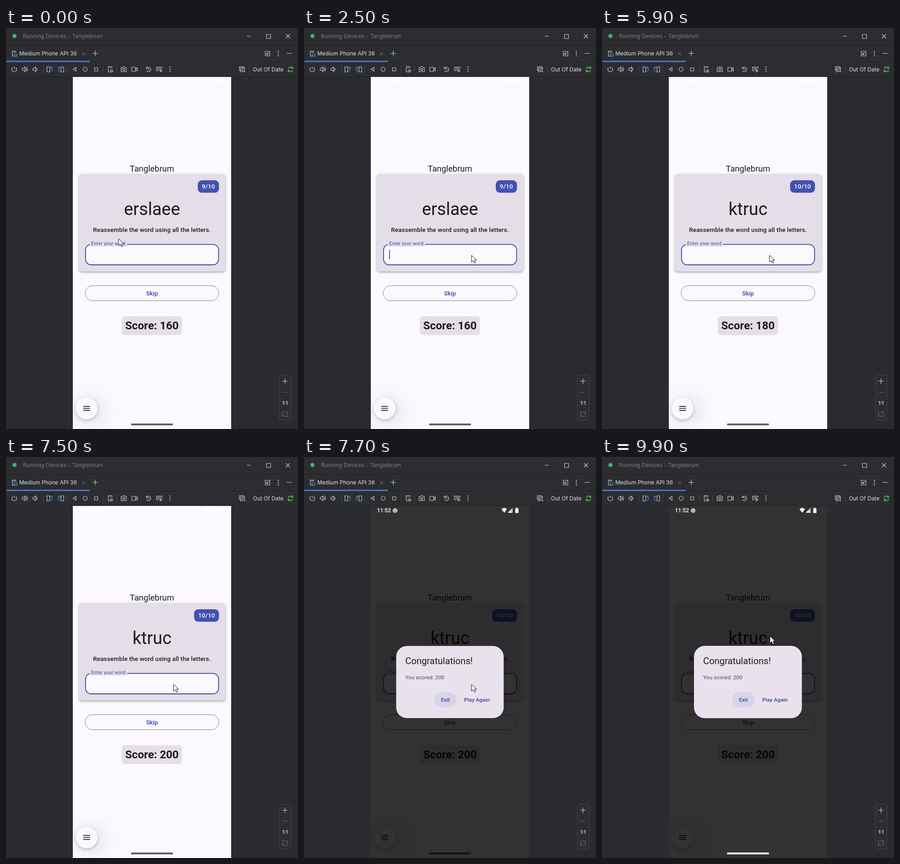
An HTML page for the animation above (10 s loop, 638 by 877 pixels).

```html
<!DOCTYPE html>
<html lang="en">
<head>
<meta charset="utf-8">
<title>Word game</title>
<style>
html, body { margin: 0; width: 100%; height: 100%; overflow: hidden; background: #2b2d30; }
svg { display: block; width: 638px; height: 877px; }
text { white-space: pre; }
.ui { font: 12px Inter, sans-serif; fill: #dfe1e5; }
.app { font-family: Roboto, sans-serif; fill: #1b1b1f; }
.mid { text-anchor: middle; }
.title { font-size: 13.47px; font-weight: 500; letter-spacing: .13px; }
.button { font-weight: 500; fill: #3a46a6; text-anchor: middle; }
.line { fill: none; stroke: #ced0d6; stroke-width: 1.15; }
.dim { stroke: #64676d; }
.blue { stroke: #548af7; }
.green { stroke: #57b65f; }
.dots { fill: #ced0d6; }
.card { filter: drop-shadow(0 2px 2px #0005); }
.fab { filter: drop-shadow(0 3px 4px #0003) drop-shadow(9px 5px 20px #0002); }
</style>
</head>
<body>
<svg viewBox="0 0 638 877">
  <defs>
    <clipPath id="screen"><path d="M146 107H492V877H146Z"/></clipPath>
    <g id="more"><circle cy="-4.8" r="1.2"/><circle r="1.2"/><circle cy="4.8" r="1.2"/></g>
    <g id="gear"><circle r="3.6"/><circle r="1.3"/><circle r="4.6" stroke-dasharray="1.8 1.8"/></g>
  </defs>

  <!-- Window, tab and tool bars -->
  <path d="M0 0H638V877H0Z" fill="#2b2d30"/>
  <path d="M0 107H638V877H0Z" fill="#2a2b2f"/>
  <path d="M0 37.5H638M0 74.5H638M0 106.5H638" stroke="#1e1f22"/>
  <path d="M1 71.5H183V74.5H1Z" fill="#4a7bd0"/>
  <circle cx="18.5" cy="17.5" r="4.5" fill="#3fb56b"/>
  <text class="ui" x="37" y="22" style="fill:#7a7d84">Running Devices - Tanglebrum</text>
  <text class="ui" x="29" y="60">Medium Phone API 36</text>
  <text class="ui" x="539.5" y="94.5">Out Of Date</text>
  <path d="M81.5 82V99M132.5 82V99M212.5 82V99M241.5 82V99M296.5 82V99M531.5 82V99" stroke="#43454a"/>

  <g class="line">
    <path d="M526 18H535M569 14H578V23H569ZM611.5 13.5L620.5 22.5M620.5 13.5L611.5 22.5"/>
    <path d="M19 61.5H14V50.5H21V54M16 52.5H19"/>
    <path class="green" d="M23 61.5H24.5"/>
    <path class="blue" d="M18 56H24V60.5H18ZM19.5 62.5H23"/>
    <path class="dim" d="M166.5 53.5L172.5 59.5M172.5 53.5L166.5 59.5"/>
    <path d="M189 55.5H201M195 49.5V61.5M613 55.5H624"/>
    <path d="M566.5 51H576.5V61H566.5ZM574 53.5L569.5 58M569.5 54.5V58H573"/>

    <path d="M18 84.5V90M14.5 86.5A5.3 5.3 0 1 0 21.5 86.5"/>
    <path d="M35.5 88H38L41.5 85V95.5L38 92.5H35.5ZM43.5 87.5Q45.5 90 43.5 92.8M45 85Q49 90 45 95.2"/>
    <path d="M59 88H61.5L65 85V95.5L61.5 92.5H59ZM67 87.5Q69 90 67 92.8"/>
    <path d="M89.5 85H95.5V96H89.5ZM126 85H120V96H126Z"/>
    <path class="blue" d="M97.5 95.5Q103.5 93 101 87.5L97.5 86M98.5 89V85.5H102M118 95.5Q112 93 114.5 87.5L118 86M117 89V85.5H113.5"/>
    <path d="M153 86V94.5L146.5 90.2ZM193.5 87H200.5V94H193.5Z"/>
    <circle cx="173" cy="90.2" r="4.4"/>
    <path d="M227 96H223.5V84.5H231.5V88M226 86.5H229"/>
    <use href="#gear" transform="translate(230.5 94) scale(.72)"/>
    <path d="M251.5 86.5H254L255.5 84.5H259L260.5 86.5H263V95.5H251.5Z"/>
    <circle cx="257.2" cy="90.7" r="2.3"/>
    <path d="M275 86H283V95H275ZM283 89.5L287 87V94L283 91.5"/>
    <path d="M306.5 85V88.5H310M307 88A5 5 0 1 1 307 93M311 88V91H313.5"/>
    <path d="M334 93.5H329V85.5H341V89M331 88H339M331 90.5H335M336.5 90L341 94L338.5 94.5L337 96.5Z"/>
    <path d="M513 93H510V84.5H519.5V87M516 96H512.5V87H521.5V89.5"/>
    <circle cx="518" cy="92" r="2.8"/><path d="M520 94L522.5 96.5"/>
    <path class="green" stroke-width="1.6" d="M616.5 89A5.2 5.2 0 0 1 626 88M626.5 84.5V88.5H622.5M626.5 92A5.2 5.2 0 0 1 617 93M616.5 96.5V92.5H620.5"/>
  </g>
  <g class="dots">
    <use href="#more" x="595" y="56"/><use href="#more" x="358.2" y="90.3"/>
  </g>

  <!-- Zoom controls -->
  <rect x="597.5" y="759.5" width="25" height="98" rx="4" fill="#2b2d30" stroke="#43454a"/>
  <path class="line" d="M603.5 772.5H615.5M609.5 766.5V778.5"/>
  <path class="line dim" d="M603.5 796.5H615.5M603.5 839H615.5V849.5H603.5ZM606 844V847H609M610 841.5H613V844.5"/>
  <text class="ui mid" x="609.7" y="824" style="font-size:10px;font-weight:600">1:1</text>

  <!-- Phone screen -->
  <g clip-path="url(#screen)">
    <path d="M146 107H492V877H146Z" fill="#fcf9fe"/>
    <text class="app mid" x="319" y="313.5" font-size="18.3">Tanglebrum</text>
    <rect class="card" x="159" y="319" width="320.5" height="213.5" rx="7" fill="#e4dee8"/>
    <rect id="badge" y="333" height="27.3" rx="9" fill="#4450b0"/>
    <text id="count" class="app title mid" y="351.3" style="fill:#fff"></text>
    <text id="word" class="app mid" x="319" y="409" font-size="37.9"></text>
    <text class="app title mid" x="319" y="446">Reassemble the word using all the letters.</text>
    <rect x="173.8" y="473.3" width="290.7" height="44.7" rx="12.5" fill="#fcf9fe" stroke="#3a46a6" stroke-width="1.8"/>
    <path d="M183 466H264.5V478H183Z" fill="#e4dee8"/>
    <text class="app" x="186" y="475" font-size="10.1" letter-spacing=".34" style="fill:#3a46a6">Enter your word</text>
    <text id="entry" class="app" x="186" y="500.3" font-size="13.47" letter-spacing=".42"></text>
    <rect id="caret" y="485.5" width="1.7" height="20.5" fill="#3a46a6"/>
    <rect x="173" y="563.5" width="292" height="33" rx="16.5" fill="none" stroke="#77747e" stroke-width=".95"/>
    <text class="button app" x="319" y="584.5" font-size="13.47" style="fill:#3a46a6">Skip</text>
    <rect x="253" y="630.5" width="131.5" height="41" rx="7" fill="#e4dee8"/>
    <text id="score" class="app mid" x="319" y="659.3" font-size="24.1" font-weight="700"></text>
    <circle class="fab" cx="176.2" cy="832" r="23.7" fill="#fcf9fe"/>
    <path d="M168.7 827.7H183.7M168.7 832H183.7M168.7 836.3H183.7" stroke="#1b1b1f" stroke-width="1.7"/>
    <rect x="273" y="865" width="92" height="4" rx="2" fill="#5f5c62"/>
    <path id="scrim" d="M146 107H492V877H146Z"/>
    <rect id="handle" x="273" y="865" width="92" height="4" rx="2" fill="#fff"/>

    <!-- Status bar -->
    <g fill="#fff">
      <text class="app" x="159.5" y="121" font-size="12" font-weight="500" style="fill:#fff">11:52</text>
      <use href="#gear" x="199" y="117" fill="none" stroke="#fff" stroke-width="1.3"/>
      <path d="M431.5 114Q437.5 108.5 443.5 114L437.5 122ZM455.5 111.5V122H445ZM461.5 112.5H463.5V111H466.5V112.5H468.5V122.5H461.5Z"/>
      <path d="M453 115V120" stroke="#313131" id="gap"/>
    </g>
  </g>

  <g id="dialog">
    <rect x="201" y="413" width="235.7" height="158.3" rx="23.5" fill="#e9e2ed"/>
    <text class="app" x="221" y="453.3" font-size="20.2">Congratulations!</text>
    <text class="app" x="221" y="486" font-size="11.8" letter-spacing=".1" style="fill:#48454e">You scored: 200</text>
    <rect x="284.7" y="514.3" width="48.7" height="33.5" rx="16.7" fill="#d8d3e6"/>
    <g font-size="11.8">
      <text class="button app" x="309" y="535.3" style="fill:#3a46a6">Exit</text>
      <text class="button app" x="378" y="535.3" style="fill:#3a46a6">Play Again</text>
    </g>
  </g>
  <path id="cursor" d="M0 0V15L3.7 11.6L6.3 17.5L9 16.3L6.5 10.7H11.2Z" fill="#fff" stroke="#111" stroke-width="1" stroke-linejoin="round"/>
</svg>
<script>
const LOOP = 10000, FIRST_SUBMIT = 4950, SECOND_SUBMIT = 7400, OPEN = 7550;
const $ = id => document.getElementById(id);
const set = (id, attrs) => { for (const k in attrs) $(id).setAttribute(k, attrs[k]); };
const ramp = (t, from, to) => Math.min(1, Math.max(0, (t - from) / (to - from)));
const ease = p => p * p * (3 - 2 * p);
const typed = (text, t, start) => text.slice(0, Math.max(0, Math.floor((t - start) / 200) + 1));

function caretOn(t) {
  if (t >= SECOND_SUBMIT) return false;
  if (t >= FIRST_SUBMIT && t < 6000) return (t - FIRST_SUBMIT) % 1000 < 500;
  const typing = t >= 2800 && t < FIRST_SUBMIT || t >= 6000;
  return typing || t % 1000 >= 500;
}

function draw(t) {
  const last = t >= FIRST_SUBMIT, done = t >= SECOND_SUBMIT;
  const left = last ? 411 : 419;
  set("badge", { x: left, width: 465.3 - left });
  set("count", { x: (left + 465.3) / 2 });
  $("count").textContent = last ? "10/10" : "9/10";
  $("word").textContent = last ? "ktruc" : "erslaee";
  $("score").textContent = "Score: " + (done ? 200 : last ? 180 : 160);

  const entry = done ? "" : last ? typed("truck", t, 6000) : typed("release", t, 2800);
  $("entry").textContent = entry;
  const width = entry ? $("entry").getComputedTextLength() : 0;
  set("caret", { x: 186 + width, opacity: +caretOn(t) });

  const shown = ramp(t, OPEN, OPEN + 130);
  const scale = .95 + .05 * ease(ramp(t, OPEN, OPEN + 180));
  set("scrim", { opacity: .8 * shown });
  set("gap", { opacity: shown });
  set("handle", { opacity: ramp(t, 7800, 7950) });
  set("dialog", { opacity: shown, transform: `translate(319 492) scale(${scale}) translate(-319 -492)` });

  const go = ease(ramp(t, 200, 1400)), up = ease(ramp(t, 9000, 9700));
  set("cursor", { transform: `translate(${246 + 120 * go + up} ${461 + 36 * go - 105 * up})` });
}

const start = performance.now();
function tick() {
  draw((performance.now() - start) % LOOP);
  requestAnimationFrame(tick);
}
tick();
</script>
</body>
</html>
```
